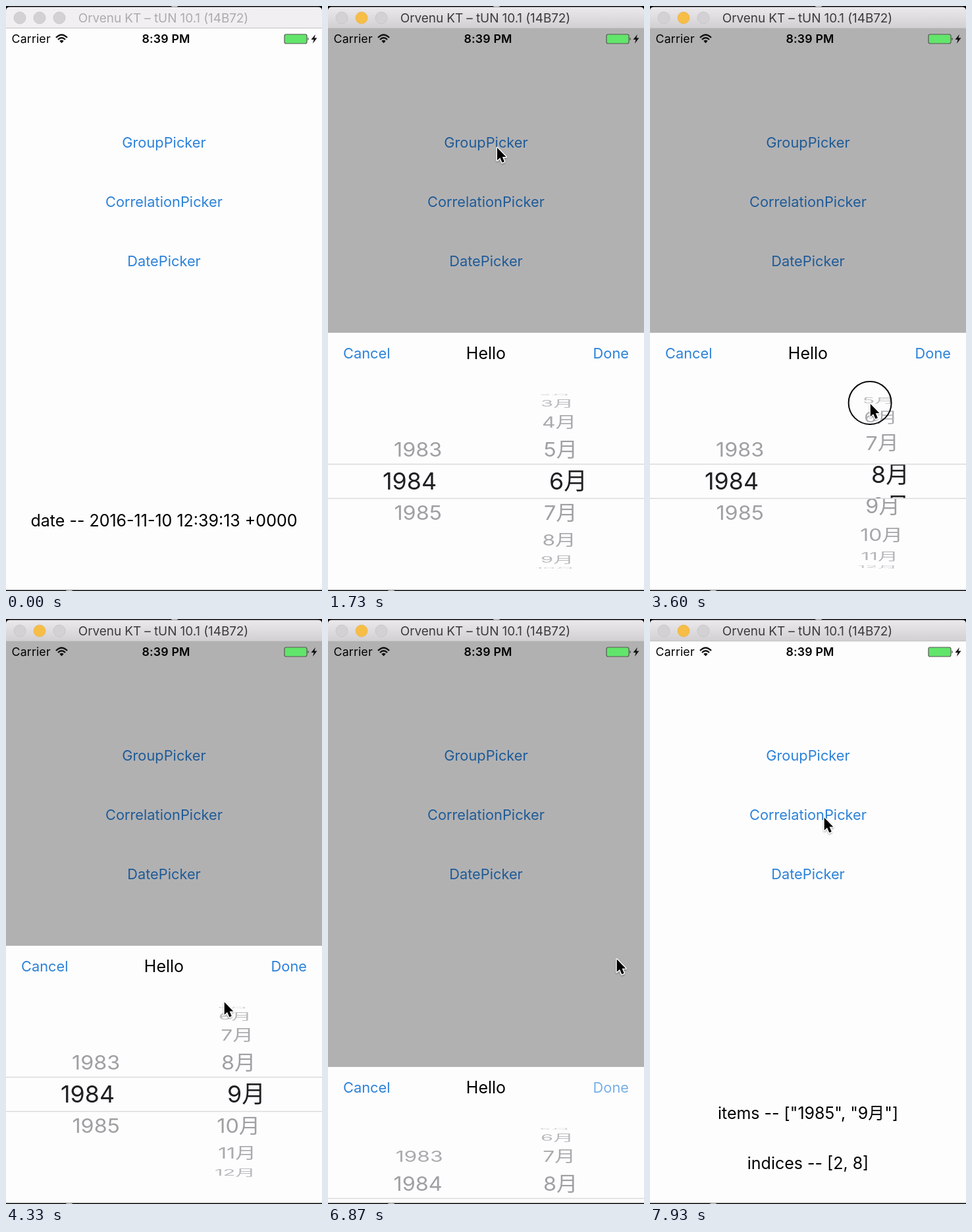
Recreate the animation shown at these times as an HTML page. Size 480 by 888 pixels, loop 8000 ms.

```html
<!DOCTYPE html>
<html lang="en">
<head>
<meta charset="utf-8">
<title>Picker demo</title>
<style>
  html, body { margin: 0; width: 100%; height: 100%; overflow: hidden; background: #fff; }
  svg { display: block; width: 480px; height: 888px; }
  text { font-family: Inter, "Noto Sans CJK JP", "Noto Sans CJK", sans-serif; white-space: pre; }
  .mid { text-anchor: middle; }
  .blue { fill: #2b82d8; font-size: 21.8px; }
  .label { font-size: 25px; }
  .title { font-size: 19px; letter-spacing: -.1px; }
  .status { font-size: 17.8px; letter-spacing: .15px; }
  .gray { font-size: 32.6px; fill: #8c8c90; }
  .dark { font-size: 35.8px; fill: #202023; }
</style>
</head>
<body>
<svg id="stage" viewBox="0 0 480 888">
  <defs>
    <linearGradient id="bar" x2="0" y2="1">
      <stop offset="0" stop-color="#ebe9eb"/><stop offset="1" stop-color="#d1cfd1"/>
    </linearGradient>
    <clipPath id="lens"><rect y="696" width="480" height="51"/></clipPath>
    <clipPath id="drum"><path d="M0 586H480V695H0ZM0 748H480V857H0Z"/></clipPath>
    <filter id="shadow" x="-50%" y="-50%" width="200%" height="200%">
      <feDropShadow dx="0" dy="1.5" stdDeviation="1.2" flood-opacity=".35"/>
    </filter>
  </defs>

  <rect width="480" height="888" fill="#050505"/>
  <rect y="30" width="480" height="857" fill="#fefdfe"/>

  <g class="mid">
    <text id="group" class="blue" x="240" y="215">GroupPicker</text>
    <text class="blue" x="240" y="305">CorrelationPicker</text>
    <text class="blue" x="240" y="395">DatePicker</text>
    <text id="date" class="label" x="240" y="790">date -- 2016-11-10 12:39:13 +0000</text>
    <g id="result">
      <text class="label" x="240" y="759">items -- ["1985", "9月"]</text>
      <text class="label" x="240" y="835">indices -- [2, 8]</text>
    </g>
  </g>
  <rect id="dim" y="34" width="480" height="853" fill="#000" opacity=".302"/>

  <g id="sheet">
    <rect y="496" width="480" height="392" fill="#fefdfe"/>
    <text class="blue" x="23" y="535">Cancel</text>
    <text class="label mid" x="240" y="536">Hello</text>
    <text id="done" class="blue" x="457" y="535" text-anchor="end">Done</text>
    <g id="far" class="mid" clip-path="url(#drum)"></g>
    <g id="near" class="mid" clip-path="url(#lens)"></g>
    <path d="M0 695.5H480M0 747.5H480" stroke="#dad9db" stroke-width="1.5"/>
  </g>

  <path id="head" d="M0 34V7Q0 1.500 6 1.500H474Q480 1.500 480 7V34Z"/>
  <path d="M0 33.5H480" stroke="#c4c2c4"/>
  <g id="lights" stroke-width=".8"></g>
  <text id="title" class="title mid" x="239" y="25">Orvenu KT – tUN 10.1 (14B72)</text>

  <text class="status" x="8.500" y="56">Carrier</text>
  <g fill="none" stroke="#111" stroke-width="2.4">
    <path d="M76 48Q84.500 39.500 93 48M79 51Q84.500 45.500 90 51"/>
  </g>
  <path d="M84.500 56.500L81.300 53Q84.500 50.500 87.700 53Z" fill="#111"/>
  <text class="status mid" x="243" y="56" font-weight="600">8:39 PM</text>
  <rect x="423" y="43" width="34" height="14" rx="2.500" fill="#62e56b" stroke="#555" stroke-width="1.200"/>
  <path d="M458.500 47.500Q461 50 458.500 52.500Z" fill="#333"/>
  <path d="M470 43L463.500 51H467.500L466 57L472.500 48.500H468.500Z" fill="#111"/>

  <rect y="886.500" width="480" height="1.500" fill="#050505"/>
  <ellipse cx="256" cy="0" rx="5" ry="1.500" fill="#ccc"/>
  <ellipse cx="96" cy="888" rx="5" ry="1.500" fill="#ccc"/>

  <g id="cursor">
    <circle id="press" r="32.500" fill="none" stroke="#080808" stroke-width="2"/>
    <path transform="translate(.7 1.500) scale(.92)"
      d="M0 0V21L4.800 16.600L8.300 24.700L12 23.100L8.600 15.200H14.800Z" fill="#000"
      stroke="#fff" stroke-width="3" stroke-linejoin="round" paint-order="stroke" filter="url(#shadow)"/>
  </g>
</svg>
<script>
const LOOP = 8000, MID = 721.5, ROW = 48, RADIUS = 132, DEPTH = 1350;
const $ = id => document.getElementById(id);
const clamp = v => Math.max(0, Math.min(1, v));
const smooth = p => p * p * (3 - 2 * p);
const ramp = (t, from, to) => smooth(clamp((t - from) / (to - from)));
const within = (t, [from, to]) => t >= from && t < to;
const show = (node, on) => node.setAttribute('display', on ? 'inline' : 'none');

function add(parent, tag, attrs, text = '') {
  const node = document.createElementNS('http://www.w3.org/2000/svg', tag);
  for (const key in attrs) node.setAttribute(key, attrs[key]);
  node.textContent = text;
  return parent.appendChild(node);
}

// Eased value from [time, ...values] keys
function track(t, keys) {
  const i = keys.findIndex(k => k[0] > t);
  if (i < 0) return keys[keys.length - 1].slice(1);
  if (!i) return keys[0].slice(1);
  const a = keys[i - 1], b = keys[i], p = ramp(t, a[0], b[0]);
  return a.slice(1).map((v, n) => v + (b[n + 1] - v) * p);
}

const path = [
  [70, 330, 588], [530, 255, 207], [1650, 255, 207], [2850, 349, 709],
  [3050, 349, 709], [3800, 331, 580], [4430, 331, 580], [5100, 138, 842],
  [5170, 138, 842], [5350, 137, 758], [5680, 137, 758], [6130, 438, 515],
  [7100, 438, 515], [7900, 264, 300]
];
const presses = [[670, 800], [1060, 1240], [2930, 3820], [5120, 5380], [6300, 6660]];
const OPEN = 1250, CLOSE = 6684, SLIDE = 390;

const lights = [21, 51, 81].map(cx => add($('lights'), 'circle', { cx, cy: 18, r: 9 }));

function wheel(items, x, lensX) {
  const rows = items.map(item => [
    add($('far'), 'text', { class: 'gray', y: 11.7 }, item),
    add($('near'), 'text', { class: 'dark', x: lensX, y: 0 }, item)
  ]);
  return pos => rows.forEach(([far, near], i) => {
    const d = i - pos, angle = d * .372, cos = Math.cos(angle);
    const on = Math.abs(angle) < 1.53;
    show(far, on);
    show(near, Math.abs(d) < 1.2);
    near.setAttribute('y', MID + 12.9 + d * ROW);
    if (!on) return;
    const s = DEPTH / (DEPTH + RADIUS * (1 - cos));
    const y = MID + RADIUS * Math.sin(angle);
    far.setAttribute('transform', `translate(${240 + x * s} ${y}) scale(${s} ${s * cos})`);
    far.setAttribute('opacity', .4 + .45 * cos);
  });
}
const years = wheel(['1983', '1984', '1985'], -104, -116 + 240);
const months = wheel(Array.from({ length: 12 }, (_, i) => i + 1 + '月'), 114, 125 + 240);

// Button opacity while held and fading back
const held = (t, [down, up]) => t < down ? 1 : t < up ? .2 : .2 + .8 * ramp(t, up, up + 400);

function draw(t) {
  const active = t >= 740;
  $('head').setAttribute('fill', active ? 'url(#bar)' : '#f2eff2');
  $('title').setAttribute('fill', active ? '#3c3b3c' : '#adabad');
  lights.forEach((light, i) => {
    const amber = active && i === 1;
    light.setAttribute('fill', amber ? '#f6bd47' : '#d4d1d4');
    light.setAttribute('stroke', amber ? '#eab552' : '#c6c3c6');
  });

  const open = within(t, [OPEN, 7065]);
  show($('dim'), open);
  show($('sheet'), open);
  show($('date'), t < CLOSE);
  show($('result'), t >= CLOSE);
  const drop = 392 * (1 - ramp(t, 1270, 1270 + SLIDE) + ramp(t, CLOSE, CLOSE + SLIDE));
  $('sheet').setAttribute('transform', `translate(0 ${drop})`);
  $('group').setAttribute('opacity', held(t, presses[1]));
  $('done').setAttribute('opacity', held(t, presses[4]));

  const [x, y] = track(t, path);
  show($('cursor'), t >= 70);
  $('cursor').setAttribute('transform', `translate(${x} ${y})`);
  show($('press'), presses.some(p => within(t, p)));

  years(1 + ramp(t, 5280, 5800));
  months(track(t, [[3050, 5], [3800, 7.69], [4300, 8]])[0]);
}

function frame(now) {
  draw(now % LOOP);
  requestAnimationFrame(frame);
}
draw(0);
requestAnimationFrame(frame);
</script>
</body>
</html>
```
